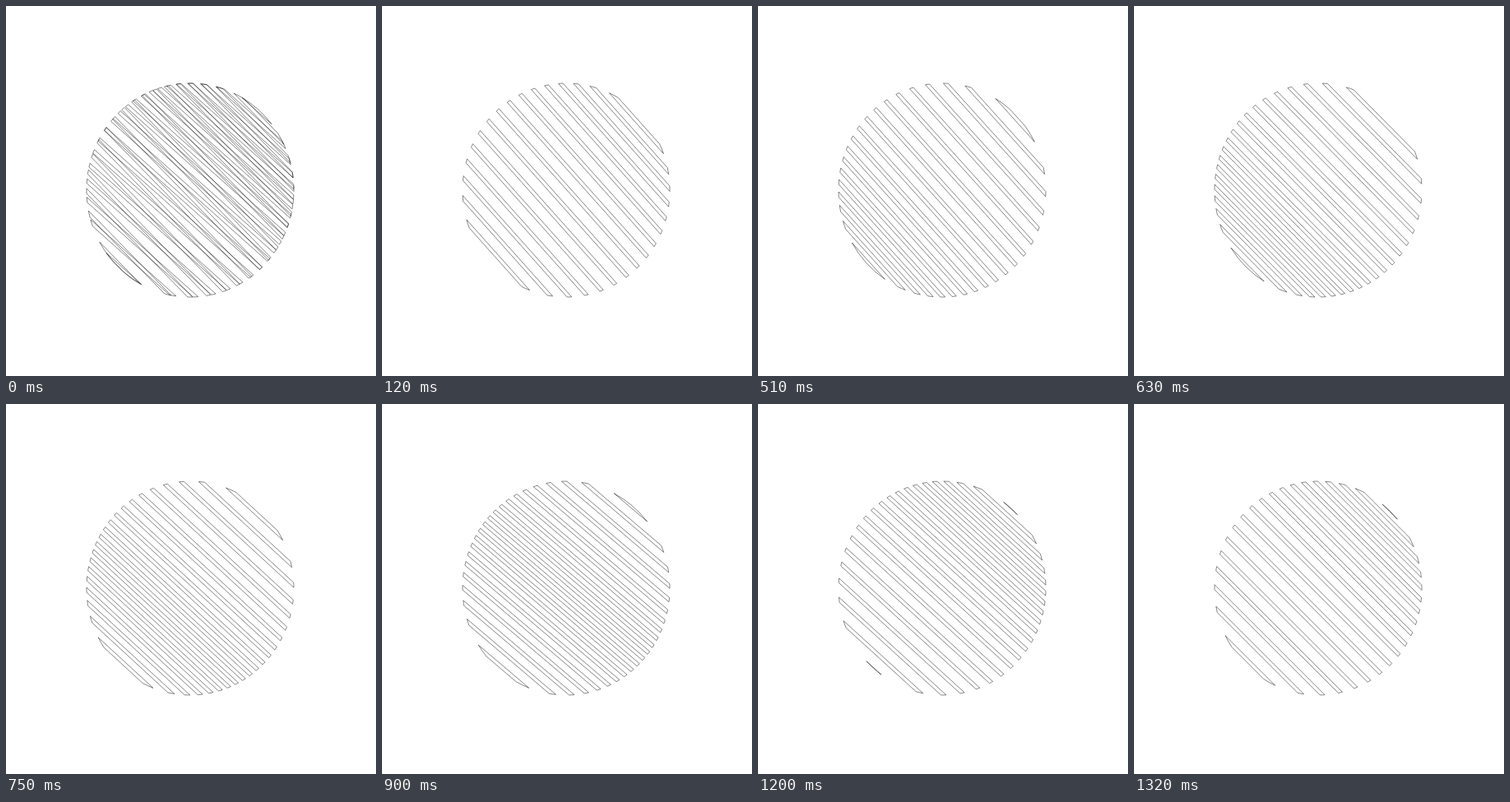
These frames come from a looping animation (450x450 px, 1.35 s). An HTML page with a canvas:

```html
<!DOCTYPE html>
<html>
<head>
<meta charset="utf-8">
<style>
html, body { margin: 0; width: 100%; height: 100%; overflow: hidden; background: #fff; }
canvas { display: block; }
</style>
</head>
<body>
<canvas id="stage" width="450" height="450"></canvas>
<script>
const ctx = document.getElementById('stage').getContext('2d');
const CX = 224, CY = 224, RX = 126, RY = 130;
const BARS = 32, PITCH = 13.55, SWING = 19.4, BAR_WIDTH = 4.3, SHIFT = 1.3;
const STEP = 30, STEPS = 45, AFTERIMAGE = 6, RAD = Math.PI / 180;

const clampedAcos = v => Math.acos(Math.max(-1, Math.min(1, v)));

// Outline of the ellipse between two parallel lines, `pos` away from its centre.
function bar(pos, angle) {
  const nx = RX * Math.sin(angle), ny = -RY * Math.cos(angle);
  const reach = Math.hypot(nx, ny), axis = Math.atan2(ny, nx);
  const low = (pos - BAR_WIDTH / 2) / reach, high = (pos + BAR_WIDTH / 2) / reach;
  if (low >= 1 || high <= -1) return;
  const outer = clampedAcos(low), inner = clampedAcos(high);
  ctx.beginPath();
  ctx.ellipse(CX, CY, RX, RY, 0, axis + inner, axis + outer);
  ctx.ellipse(CX, CY, RX, RY, 0, axis - outer, axis - inner);
  ctx.closePath();
  ctx.stroke();
}

// Bars swing around 45 degrees while a wave of density travels across them.
function bars(step) {
  const phase = (step + 1) / STEPS * 2 * Math.PI;
  const angle = (45 + 5 * Math.sin(phase)) * RAD;
  for (let i = 0; i < BARS; i++) {
    const k = i - (BARS - 1) / 2;
    bar(SHIFT + k * PITCH + SWING * Math.sin((k * 11.6 + 71.3) * RAD - phase), angle);
  }
}

function draw(time) {
  const step = Math.floor(time / STEP) % STEPS;
  ctx.fillStyle = '#fff';
  ctx.fillRect(0, 0, 450, 450);
  ctx.strokeStyle = '#000';
  ctx.lineWidth = 0.48;
  // The loop opens with an earlier pose still showing.
  if (step === 0) bars(-AFTERIMAGE);
  bars(step);
}

function tick() {
  draw(performance.now());
  requestAnimationFrame(tick);
}
tick();
</script>
</body>
</html>
```
